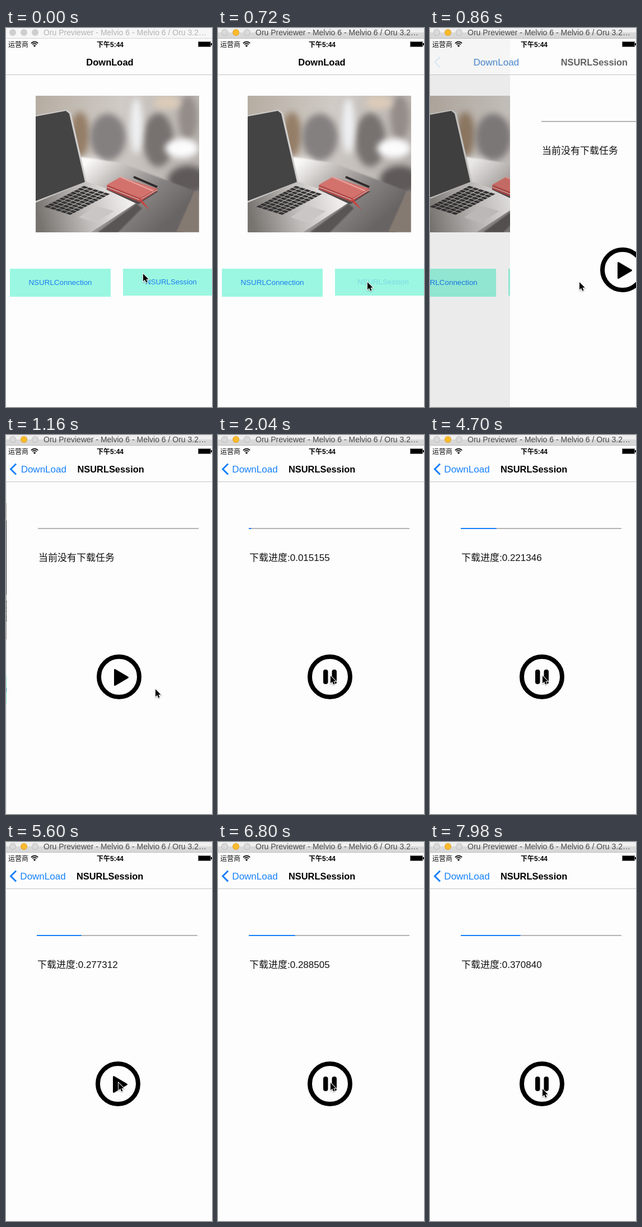
Animation of 368x677 px, one loop 8 s. Source, as an HTML page with a canvas:

```html
<!DOCTYPE html>
<html lang="zh">
<head>
<meta charset="utf-8">
<title>DownLoad</title>
<style>
html, body { margin: 0; width: 100%; height: 100%; overflow: hidden; background: #fdfdfd; }
canvas { display: block; width: 368px; height: 677px; }
</style>
</head>
<body>
<canvas id="stage" width="368" height="677"></canvas>
<script>
const W = 368, H = 677, LOOP = 8000;
const SANS = '"Liberation Sans", "Noto Sans CJK SC", "Noto Sans CJK", sans-serif';
const BLUE = '#1580fb', PAPER = '#fdfdfd';

const CLICK = 708, TICK = 147.7;
const BEGIN = 8, PAUSE = 33, RESUME = 40;
const RATE = [[9, 0.015155], [17, 0.111807], [27, 0.221346], [33, 0.288505], [41, 0.37084]];

const stage = document.getElementById('stage').getContext('2d');
let ctx = stage;

const clamp = x => Math.min(1, Math.max(0, x));
const lerp = (a, b, k) => a + (b - a) * k;

function ease(from, to, x) {
  const k = clamp((x - from) / (to - from));
  return k * k * (3 - 2 * k);
}

// Downloaded share: time spent paused does not count.
function progress(step) {
  const n = Math.min(step, PAUSE - 1) + Math.max(0, step - RESUME);
  const last = RATE.findIndex(([at], i) => i > 0 && n <= at);
  const [n0, p0] = RATE[last - 1], [n1, p1] = RATE[last];
  return lerp(p0, p1, (n - n0) / (n1 - n0));
}

function cursorAt(t, step) {
  const k = Math.min(2, Math.floor(t / 150)) / 2;
  const move = ease(3, 7, step);
  const nudge = 13 * Math.sin(Math.PI * clamp((step - 35) / 4));
  return [
    lerp(lerp(245, 267, k), 201, move),
    lerp(lerp(439, 454, k), 430, move) + nudge + 11 * ease(42, 45, step)
  ];
}

function rect(x, y, w, h, fill) {
  ctx.fillStyle = fill;
  ctx.fillRect(x, y, w, h);
}

function path(points, close = true) {
  ctx.beginPath();
  for (let i = 0; i < points.length; i += 2) ctx.lineTo(points[i], points[i + 1]);
  if (close) ctx.closePath();
}

function poly(fill, ...points) {
  path(points);
  ctx.fillStyle = fill;
  ctx.fill();
}

function line(color, width, ...points) {
  path(points, false);
  ctx.strokeStyle = color;
  ctx.lineWidth = width;
  ctx.stroke();
}

function blob(x, y, rx, ry, fill) {
  ctx.beginPath();
  ctx.ellipse(x, y, rx, ry, 0, 0, 7);
  ctx.fillStyle = fill;
  ctx.fill();
}

function ramp(x0, y0, x1, y1, ...colors) {
  const g = ctx.createLinearGradient(x0, y0, x1, y1);
  colors.forEach((c, i) => g.addColorStop(i / (colors.length - 1), c));
  return g;
}

function text(str, x, y, size, color, { bold = false, align = 'left', alpha = 1 } = {}) {
  ctx.globalAlpha = alpha;
  ctx.font = `${bold ? 'bold ' : ''}${size}px ${SANS}`;
  ctx.textAlign = align;
  ctx.fillStyle = color;
  ctx.fillText(str, x, y);
  ctx.globalAlpha = 1;
}

function drawKeyboard() {
  ctx.save();
  // unit square onto the keyboard's slanted plane
  ctx.transform(48, 15, -72, 38, 139, 282);
  const cols = 5, rows = 11;
  for (let i = 0; i < cols; i++) {
    for (let j = 0; j < rows; j++) {
      rect(i / cols, j / rows, 0.85 / cols, 0.8 / rows, '#343333');
    }
  }
  ctx.restore();
}

function drawPhoto() {
  const c = document.createElement('canvas');
  c.width = 292;
  c.height = 244;
  ctx = c.getContext('2d');
  ctx.translate(-53, -121);
  rect(53, 121, 292, 244, ramp(53, 121, 345, 200, '#b5aca1', '#d0cbc6', '#b8b2ae'));

  // blurred room
  ctx.filter = 'blur(6px)';
  blob(132, 190, 17, 40, '#957e67');
  blob(182, 195, 32, 42, '#858080');
  blob(272, 200, 27, 48, '#77716f');
  blob(325, 160, 17, 40, '#938c88');
  blob(325, 272, 36, 26, '#5f5a59');
  blob(288, 133, 24, 12, '#dccbb8');
  blob(233, 175, 11, 50, '#eef0f2');
  blob(314, 215, 30, 17, '#fcfcfd');
  blob(150, 243, 22, 10, '#f3f1ef');

  ctx.filter = 'blur(1px)';
  poly(ramp(150, 235, 270, 365, '#faf9f8', '#bab5b2', '#858180', '#686463'),
    130, 230, 205, 241, 337, 291, 318, 365, 53, 365);
  poly('#857a72', 337, 291, 345, 294, 345, 365, 304, 365);
  poly('#595555', 164, 365, 233, 314, 243, 322, 200, 365);
  ctx.filter = 'none';

  // laptop
  poly(ramp(60, 345, 215, 305, '#77736f', '#bdbab8', '#f0eeed'),
    53, 308, 142, 274, 230, 304, 233, 312, 152, 365, 53, 365);
  drawKeyboard();
  poly('#c9c6c5', 130, 338, 161, 318, 193, 327, 159, 348);
  poly('#cfcdcc', 53, 156, 108, 146, 116, 151, 144, 274, 53, 312);
  poly('#454444', 53, 158, 107, 148, 113, 153, 141, 275, 53, 309);

  // notebook and pen
  poly('#524b4a', 178, 288, 236, 315, 272, 292);
  poly('#b04a48', 180, 281, 180, 288, 239, 311, 270, 291, 270, 286);
  poly('#d3726d', 180, 280, 205, 266, 270, 287, 240, 304);
  line('#ece0dc', 1, 180, 284, 239, 307, 270, 289);
  line('#e9a49e', 2, 204, 266, 263, 291);
  line('#2e2929', 4, 228, 266, 270, 284);
  line('#c9443f', 3, 238, 304, 247, 315, 242, 311);
  ctx = stage;
  return c;
}
const photo = drawPhoto();

function drawHome(pressed) {
  rect(-10, 18, W + 150, H, PAPER);
  ctx.drawImage(photo, 53, 121);
  rect(7, 430, 180, 50, '#9bf7e1');
  rect(209, 430, 172, 48, '#9bf7e1');
  text('NSURLConnection', 97, 459, 13.4, '#1a7df2', { align: 'center' });
  text('NSURLSession', 295, 458, 13.2, '#1a7df2', { align: 'center', alpha: pressed ? 0.25 : 1 });
}

function drawDetail(step) {
  rect(-1, 18, W + 10, H, PAPER);
  rect(55, 166, 287, 2, '#b4b4b4');
  const started = step >= BEGIN;
  let label = '当前没有下载任务';
  if (started) {
    const p = progress(step);
    rect(55, 166, 287 * p, 2, BLUE);
    label = '下载进度:' + p.toFixed(6);
  }
  text(label, 56, 225, 17, '#111');

  ctx.strokeStyle = ctx.fillStyle = '#000';
  ctx.lineWidth = 8;
  ctx.beginPath();
  ctx.arc(200, 432, 36, 0, 7);
  ctx.stroke();
  if (started && (step < PAUSE || step >= RESUME)) {
    ctx.beginPath();
    ctx.roundRect(188, 419, 8.5, 26, 4);
    ctx.roundRect(203.5, 419, 8.5, 26, 4);
    ctx.fill();
  } else {
    ctx.lineJoin = 'round';
    ctx.lineWidth = 3;
    path([192.5, 419.5, 215.5, 433, 192.5, 446.5]);
    ctx.fill();
    ctx.stroke();
    ctx.lineJoin = 'miter';
  }
}

function drawNav(left) {
  const done = 1 - left;
  rect(0, 18, W, 65, 'rgba(253,253,253,0.55)');
  rect(0, 83, W, 1, '#c4c4c4');
  const x = 66 + 119.5 * left ** 0.86;
  text('DownLoad', x, 67, 16.5, '#000', { bold: true, align: 'center', alpha: left ** 3 });
  if (!done) return;
  const k = done ** 0.5;
  text('DownLoad', x, 67, 17, `rgb(${21 * k}, ${128 * k}, ${251 * k})`, { align: 'center', alpha: done ** 0.7 });
  text('NSURLSession', 126 + 281 * left, 67, 16.4, '#000', { bold: true, alpha: done });
  ctx.globalAlpha = done ** 5;
  line(BLUE, 3, 18, 51.5, 8.5, 61, 18, 70.5);
  ctx.globalAlpha = 1;
}

function drawStatus() {
  text('运营商', 4, 34, 12, '#111');
  ctx.strokeStyle = '#000';
  ctx.lineWidth = 1.7;
  for (const r of [8.3, 5.2]) {
    ctx.beginPath();
    ctx.arc(51, 33, r, -Math.PI * 0.76, -Math.PI * 0.24);
    ctx.stroke();
  }
  poly('#000', 51, 34, 48.6, 31.4, 51, 30.2, 53.4, 31.4);
  text('下午5:44', 162, 34, 12, '#000', { bold: true });
  rect(343, 24, 23, 10, '#777');
  rect(344, 25, 21, 8, '#000');
  rect(366, 27, 2, 4, '#000');
}

function drawWindowBar(active) {
  rect(0, 0, W, 18, active ? '#efefef' : '#f6f6f6');
  if (active) rect(0, 8, W, 10, '#d8d8d8');
  rect(0, 18, W, 1, active ? '#bcbcbc' : '#d6d6d6');
  for (let i = 0; i < 3; i++) {
    const x = 12 + 20 * i, lit = active && i === 1;
    blob(x, 8, 6, 6, lit ? '#dfa023' : active ? '#bdbdbd' : '#cecece');
    if (active) blob(x, 8, 5, 5, lit ? '#fcbb2d' : '#dadada');
  }
  text('Oru Previewer - Melvio 6 - Melvio 6 / Oru 3.2…', 67, 13, 14, active ? '#484848' : '#b3b3b3');
}

function drawCursor(x, y) {
  ctx.save();
  ctx.translate(x, y);
  ctx.scale(0.93, 0.93);
  path([0, 0, 0, 14.5, 3.3, 11.4, 5.6, 16.8, 8.1, 15.7, 5.8, 10.5, 10.3, 10.5]);
  ctx.shadowColor = 'rgba(0,0,0,0.35)';
  ctx.shadowBlur = 2;
  ctx.shadowOffsetY = 1;
  ctx.strokeStyle = '#fff';
  ctx.lineWidth = 2;
  ctx.stroke();
  ctx.shadowColor = 'transparent';
  ctx.fillStyle = '#000';
  ctx.fill();
  ctx.restore();
}

// Share of the push still to go: a critically damped spring.
function pushLeft(step) {
  if (step < 1) return 1;
  const wt = 2.085 + 2.66 * (step - 1);
  const left = (1 + wt) * Math.exp(-wt);
  return left < 0.002 ? 0 : left;
}

function draw(t) {
  const step = Math.max(-1, Math.floor((t - CLICK) / TICK));
  const left = pushLeft(step);

  rect(0, 0, W, H, PAPER);
  if (left > 0) {
    ctx.save();
    ctx.translate(-Math.round(112.5 * (1 - left)), 0);
    drawHome(step === 0);
    ctx.restore();
    rect(0, 18, W, H, `rgba(0,0,0,${0.115 * (1 - left)})`);
  }
  if (left < 1) {
    ctx.save();
    ctx.translate(Math.round(375 * left), 0);
    drawDetail(step);
    ctx.restore();
  }
  drawNav(left);
  drawStatus();
  drawWindowBar(step >= 0);
  drawCursor(...cursorAt(t, step));
}

const start = performance.now();
function tick(now) {
  draw(Math.max(0, now - start) % LOOP);
  requestAnimationFrame(tick);
}
draw(0);
requestAnimationFrame(tick);
</script>
</body>
</html>
```
